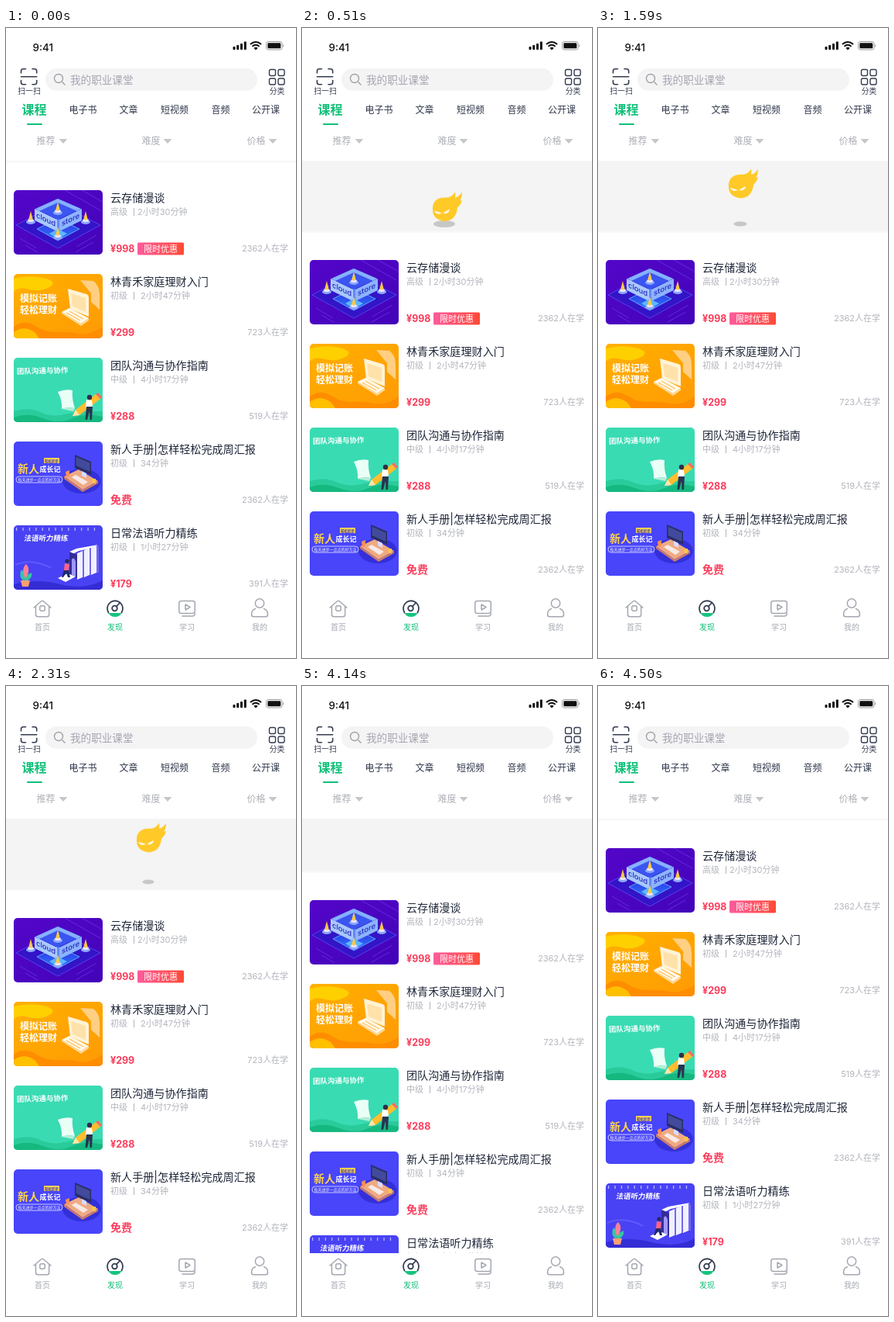
An HTML page for the animation above (4530 ms loop, 375 px wide and 812 px high).

```html
<!DOCTYPE html>
<html lang="zh-CN">
<head>
<meta charset="utf-8">
<title>课程</title>
<style>
html, body { margin: 0; width: 100%; height: 100%; overflow: hidden; background: #fff; }
svg { display: block; width: 375px; height: 812px; }
text { font-family: Inter, "Noto Sans CJK SC", "Noto Sans CJK", sans-serif; }
.mid { text-anchor: middle; }
.end { text-anchor: end; }
.line { fill: none; stroke-linecap: round; stroke-linejoin: round; }
.dark { stroke: #343c50; stroke-width: 1.6; }
.gray { stroke: #a4a7b1; stroke-width: 1.5; }
.title { font-size: 14.1px; fill: #1f2739; }
.meta { font-size: 11px; fill: #b3b5bd; }
.price { font-size: 12.5px; font-weight: 700; fill: #fb3d5c; }
.list, .ball, .shadow, .mascot { animation: 4.53s infinite; }
.list { animation-name: pull; }
.ball { animation-name: bounce; animation-timing-function: cubic-bezier(.333, 0, .667, 1); }
.shadow { animation-name: squeeze; animation-timing-function: cubic-bezier(.333, 0, .667, 1); transform-origin: 184px 252.5px; }
.mascot { animation-name: show; animation-timing-function: step-end; }
@keyframes pull {
  0% { transform: none; animation-timing-function: cubic-bezier(.4, 0, .5, 1); }
  11%  { transform: translateY(90px); animation-timing-function: linear; }
  84.77% { transform: translateY(90px); animation-timing-function: cubic-bezier(.65, 0, .6, 1); }
  99.3%, 100% { transform: none; }
}
@keyframes bounce {
  0%, .44%, 20.75%, 32.23%, 52.54%, 64.02%, 88.74%, 100% { transform: translateY(-37.5px); }
  10.6%, 42.38%, 74.17%, 78.59% { transform: none; }
}
@keyframes squeeze {
  0%, .44%, 20.75%, 32.23%, 52.54%, 64.02%, 88.74%, 100% { transform: scale(.5, .6); }
  10.6%, 42.38%, 74.17%, 78.59% { transform: none; }
}
@keyframes show {
  0% { opacity: 1; }
  84.5%, 100% { opacity: 0; }
}
</style>
</head>
<body>
<svg viewBox="0 0 375 812">
  <defs>
    <clipPath id="card"><rect width="115" height="83" rx="5"/></clipPath>
    <linearGradient id="hot"><stop stop-color="#ff5c9c"/><stop offset="1" stop-color="#ff4936"/></linearGradient>
    <linearGradient id="violet" x2="1" y2="1"><stop stop-color="#5406c9"/><stop offset="1" stop-color="#4204b8"/></linearGradient>
    <linearGradient id="floor" x2="0" y2="1"><stop stop-color="#2c2be0"/><stop offset="1" stop-color="#2f7bff"/></linearGradient>
    <linearGradient id="sun" x2="1" y2="1"><stop stop-color="#ffb000"/><stop offset="1" stop-color="#ff9a04"/></linearGradient>
    <g id="lamp">
      <ellipse cy="5" rx="6" ry="3" fill="#8fa6ff"/><ellipse cy="3" rx="4" ry="2" fill="#e9e6ff"/>
      <path d="M0-9L2.6 1Q0 4-2.6 1Z" fill="#ffc945"/>
    </g>

    <g id="art0">
      <rect width="115" height="83" fill="url(#violet)"/>
      <path d="M8 62L30 75M15 71L31 80M107 58L81 73M103 67L80 80M66 0L112 26M88 0L115 15" stroke="#6427e2"/>
      <path d="M3 45L57 17L112 45L57 75Z" fill="#3314c6" stroke="#5f4bff" stroke-width=".8"/>
      <path d="M30 50L57 37L85 50L57 65Z" fill="url(#floor)" stroke="#59a4ff"/>
      <path d="M28 24L57 11L87 24L57 38Z" fill="#3a55f0"/>
      <path d="M28 24L57 11V16L33 27ZM87 24L57 11V16L82 27Z" fill="#86b1ff"/>
      <path d="M27 24L56 38V53L27 39Z" fill="#a9c9ff"/><path d="M88 24L59 38V53L88 39Z" fill="#8db4ff"/>
      <path d="M56 38H59V53H56Z" fill="#6487f5"/>
      <path d="M46 56L57 50L69 56L57 63Z" fill="#5fb6ff"/>
      <g font-size="9.5" font-weight="500" fill="#2429b8" class="mid">
        <text transform="matrix(1 .48 0 1 41.5 41)">cloud</text>
        <text transform="matrix(1 -.48 0 1 73.5 41)">store</text>
      </g>
      <use href="#lamp" x="22" y="36"/><use href="#lamp" x="93" y="36"/>
      <use href="#lamp" x="57" y="24"/><use href="#lamp" x="57" y="56"/>
    </g>

    <g id="art1">
      <rect width="115" height="83" fill="url(#sun)"/>
      <path d="M0 6Q20 1 38 5T48 16Q34 24 20 20T0 23Z" fill="#ffd000"/>
      <path d="M0 68Q14 58 28 67T56 75T84 77T115 68V83H0Z" fill="#ff8d00"/>
      <path d="M0 75Q14 65 28 76L33 83H0Z" fill="#ffc000"/>
      <path d="M86 8L103 9Q111 15 111 27V46L100 36V25Z" fill="#ffcf83"/>
      <path d="M70 19L94 26Q97 27 97 31V55L73 45Z" fill="#fff3d7"/>
      <path d="M74 25L93 31V49L76 42Z" fill="#ffe2aa"/>
      <path d="M62 49L72 44L97 57L87 64Z" fill="#fff9ea"/>
      <path d="M62 49V51L87 67L97 60V57L87 64Z" fill="#ffd894"/>
      <path d="M68 50L86 60M72 48L90 58" stroke="#ffbd59" stroke-width="1.2"/>
      <g font-size="12" font-weight="900" fill="#fff"><text x="8" y="36">模拟记账</text><text x="8" y="50.5">轻松理财</text></g>
    </g>

    <g id="art2">
      <rect width="115" height="83" fill="#39dbb3"/>
      <path d="M0 69Q18 63 34 70T66 73T115 69V83H0Z" fill="#2acb9b"/>
      <path d="M0 77Q18 70 38 78T76 78T115 76V83H0Z" fill="#15b87f"/>
      <path d="M57 44Q67 40 76 42Q75 54 79 65Q70 63 62 66Q63 55 57 44Z" fill="#eafff6"/>
      <path d="M62 66Q69 63 79 65L77 69Z" fill="#b5eed9"/>
      <path d="M76 75L80 67L106 47L112 53L85 74Z" fill="#ffbd2f"/>
      <path d="M76 75L80 67L85 74Z" fill="#ffe5b1"/><path d="M106 47L109 45L114 51L112 53Z" fill="#ff6965"/>
      <circle cx="98" cy="51" r="3.2" fill="#302d4b"/><path d="M94 54L101 55L102 64H93Z" fill="#fff"/>
      <path d="M94 63H102L101 80H98.5L98 69L95 80H92.5Z" fill="#263451"/>
      <text x="4" y="21" font-size="9.5" font-weight="700" fill="#fff" transform="rotate(-1.5 4 20)">团队沟通与协作</text>
    </g>

    <g id="art3">
      <rect width="115" height="83" fill="#4845fa"/>
      <ellipse cx="88" cy="51" rx="25" ry="16" fill="#3430d9"/>
      <path d="M65 45L84 36L109 51L89 62Z" fill="#efaa82"/><path d="M65 45V48L89 65L109 54V51L89 62Z" fill="#c87a70"/>
      <path d="M79 17L100 26V43L79 34Z" fill="#292d63"/><path d="M80.5 19.5L98.500 27.5V39L80.500 31Z" fill="#424a9b"/>
      <path d="M88 38V44L94 47V41Z" fill="#d8dcff"/><path d="M75 46L80 43L96 52L90 56Z" fill="#f7e9e7"/>
      <path d="M67 39L72 37V45L68 46Z" fill="#ff8e57"/><path d="M101 48H106V54H102Z" fill="#ffc448"/>
      <rect x="39" y="21" width="20" height="7" rx="1" fill="#ffd64f"/>
      <text x="49" y="26.5" class="mid" font-size="4.5" font-weight="700" fill="#433cad">轻松起步</text>
      <text x="5" y="39.5" font-size="14" font-weight="900" fill="#ffd548">新人</text>
      <text x="33.5" y="39" font-size="9" font-weight="800" fill="#fff">成长记</text>
      <rect x="3" y="45" width="60" height="8" rx="4" fill="none" stroke="#fff" stroke-width=".7"/>
      <text x="33" y="51" class="mid" font-size="5" fill="#fff">每天进步一点点的好方法</text>
    </g>

    <g id="art4">
      <rect width="115" height="83" fill="#4842f4"/>
      <path d="M3 5H112" stroke="#b9b5ff" stroke-width="4" stroke-dasharray="1.3 7.1"/>
      <path d="M2 51Q24 42 48 55" fill="none" stroke="#5f59ff" stroke-width="2"/>
      <path d="M0 76Q30 68 60 76T115 71V83H0Z" fill="#342cd4"/>
      <path d="M72 34L81 30L109 25L101 29L93 31L84 33L76 37Z" fill="#fff"/>
      <path d="M72 34L82 38V68L72 63Z" fill="#332c9b"/><path d="M75 44Q78 40 80 47V66L75 64Z" fill="#9f98ff"/>
      <g id="books">
        <path d="M82 36L89 33V67L82 70ZM91 32L98 29V64L91 67ZM100 29L107 26V61L100 64Z" fill="#f1f0ff"/>
        <path d="M89 33L91 32V67L89 67ZM98 29L100 29V64H98ZM107 26L110 27V61L107 61Z" fill="#7168ee"/>
      </g>
      <path d="M57 68L70 62L80 66L67 73Z" fill="#fff"/>
      <circle cx="69" cy="46" r="2.6" fill="#27295a"/><path d="M66 49L72 50L71 58H65Z" fill="#ff6582"/>
      <path d="M65 58H71L73 67H70L68 61L64 67H62Z" fill="#202a62"/>
      <path d="M14 73Q5 66 10 57Q17 63 14 73Q25 69 23 61Q14 64 14 73" fill="#33c7a2"/>
      <path d="M15 69Q9 56 16 50Q23 57 15 69Z" fill="#ff8095"/><path d="M9 71H21L19 79H11Z" fill="#ff9f71"/>
      <text transform="translate(13 20) skewX(-8)" font-size="9.5" font-weight="900" fill="#fff">法语听力精练</text>
    </g>
  </defs>

  <rect width="375" height="812" fill="#fff"/>
  <rect y="171" width="375" height="560" fill="#f4f4f4"/>

  <g class="mascot">
    <ellipse class="shadow" cx="184" cy="252.5" rx="14" ry="4.5" fill="#c7c7c7"/>
    <g class="ball">
      <path d="M169 235C168 223 176 218 186 219C192 219 195 216 198 212C199 215 198 217 198 219C202 218 205 215 207 212C207 217 206 220 204 223L207 222C206 227 203 230 201 232C200 243 194 249 185 249.5C176 249 169 244 169 235Z" fill="#ffc928"/>
      <path d="M171 236L181 239Q174 242 171 236ZM182 239L191 234Q190 241 182 239Z" fill="#fff"/>
    </g>
  </g>

  <g class="list">
    <rect y="172" width="375" height="700" fill="#fff"/>
    <rect y="172" width="375" height="2" fill="#f9f9f9"/>
    <g id="items"></g>
  </g>

  <rect width="375" height="171" fill="#fff"/>
  <text x="34.5" y="29.5" font-size="13.4" font-weight="500" fill="#111">9:41</text>
  <g fill="#111">
    <rect x="293.5" y="24" width="3" height="4" rx=".7"/><rect x="298.2" y="22" width="3" height="6" rx=".7"/>
    <rect x="303" y="20" width="3" height="8" rx=".7"/><rect x="307.8" y="17.5" width="3" height="10.5" rx=".7"/>
    <path d="M323 28.5L320.3 25.7Q323 23.6 325.7 25.7Z"/>
    <g class="line" stroke="#111" stroke-width="2" style="stroke-linecap:butt">
      <path d="M318.4 23.7Q323 19.8 327.6 23.7M315.9 20.9Q323 15 330.1 20.9"/>
    </g>
    <rect x="336.5" y="17.5" width="20.5" height="10.5" rx="2.8" fill="none" stroke="#999"/>
    <rect x="338.3" y="19.3" width="17" height="7" rx="1.4"/><path d="M358.3 20.8Q360.5 22.8 358.3 24.8Z" fill="#999"/>
  </g>

  <path class="line dark" d="M19.5 58V55.5Q19.5 52.8 22.2 52.8H25.5M34 52.8H37Q39.7 52.8 39.7 55.5V58M39.7 67.5V70Q39.7 72.7 37 72.7H34M25.5 72.7H22.2Q19.5 72.7 19.5 70V67.5M19.5 62.7H39.7"/>
  <text class="mid" x="30" y="85.3" font-size="9.8" fill="#343c50">扫一扫</text>
  <rect x="51" y="52" width="274" height="29" rx="14.5" fill="#f4f4f4"/>
  <path class="line" d="M73 70L76 73" stroke="#a1a2aa" stroke-width="1.5"/>
  <circle class="line" cx="68" cy="65" r="5.5" stroke="#a1a2aa" stroke-width="1.4"/>
  <text x="83" y="72" font-size="13.6" fill="#a5a5b4">我的职业课堂</text>
  <g class="line dark" style="stroke-width:1.4">
    <rect x="340.5" y="53.5" width="8" height="8" rx="2"/><rect x="352" y="53.5" width="8" height="8" rx="2"/>
    <rect x="340.5" y="65" width="8" height="8" rx="2"/><rect x="352" y="65" width="8" height="8" rx="2"/>
  </g>
  <text class="mid" x="350.5" y="85.3" font-size="9.8" fill="#343c50">分类</text>

  <text x="20.5" y="111.3" font-size="16" font-weight="700" fill="#0fbf78">课程</text>
  <rect x="27" y="123" width="20" height="2" rx="1" fill="#0fbf78"/>
  <g font-size="12" fill="#30384c">
    <text x="81.5" y="110">电子书</text><text x="146.5" y="110">文章</text><text x="200" y="110">短视频</text>
    <text x="265.5" y="110">音频</text><text x="318" y="110">公开课</text>
  </g>
  <g font-size="12" fill="#aeb0b7">
    <text x="39.5" y="150">推荐</text><text x="175.5" y="150">难度</text><text x="311.5" y="150">价格</text>
    <path d="M68.5 143H79.5L74 149ZM203.5 143H214.5L209 149ZM339.5 143H350.5L345 149Z" fill="#c6c7ca"/>
  </g>

  <rect y="731" width="375" height="81" fill="#fff"/>
  <g class="line gray">
    <path d="M36 747L46 738.5Q47 737.8 48 738.5L58 747M38.5 745.5V756Q38.5 758.8 41.3 758.8H53Q55.7 758.8 55.7 756V745.5"/>
    <rect x="43.8" y="744.8" width="6.5" height="6.5" rx="2"/>
    <rect x="223.8" y="738.5" width="20.5" height="16" rx="3"/><path d="M232 743V750L238 746.5ZM228 758H241Q244 758 244.5 755"/>
    <circle cx="328" cy="741.5" r="5.7"/>
    <path d="M322.5 748.5Q317.5 750 317.5 756Q317.5 758.8 320.300 758.800H335.700Q338.500 758.800 338.500 756Q338.500 750 333.500 748.500"/>
  </g>
  <path d="M132.5 754H149.5Q147 759 141 759Q135 759 132.5 754Z" fill="#16c47e"/>
  <g class="line dark" style="stroke-width:1.8">
    <path d="M132.5 753.5A10 10 0 1 1 149.5 753.5M147.5 740.5L142.8 745.5"/><circle cx="140.5" cy="748" r="3.3"/>
  </g>
  <g class="mid" font-size="10" fill="#a4a7b1">
    <text x="47" y="776">首页</text><text x="141" y="776" fill="#0fbf78">发现</text>
    <text x="234" y="776">学习</text><text x="328" y="776">我的</text>
  </g>
</svg>
<script>
const courses = [
  ['云存储漫谈', '高级', '2小时30分钟', '¥998', 2362],
  ['林青禾家庭理财入门', '初级', '2小时47分钟', '¥299', 723],
  ['团队沟通与协作指南', '中级', '4小时17分钟', '¥288', 519],
  ['新人手册|怎样轻松完成周汇报', '初级', '34分钟', '免费', 2362],
  ['日常法语听力精练', '初级', '1小时27分钟', '¥179', 391]
];
const badge = `<rect x="170" y="67.5" width="60" height="16" rx="1.5" fill="url(#hot)"/>
  <text class="mid" x="200" y="79.6" font-size="11" fill="#fff">限时优惠</text>`;
const row = ([title, level, time, price, count], i) => `
  <g transform="translate(0 ${209 + i * 108})">
    <g transform="translate(10 0)" clip-path="url(#card)"><use href="#art${i}"/></g>
    <text class="title" x="135" y="14.5">${title}</text>
    <text class="meta" x="135" y="32">${level}</text>
    <rect x="165" y="23" width="1" height="10" fill="#b3b5bd"/>
    <text class="meta" x="${i ? 174 : 170}" y="32">${time}</text>
    <text class="price" x="135" y="79.5"${price === '免费' ? ' style="font-size:14px"' : ''}>${price}</text>
    ${i ? '' : badge}
    <text class="meta end" x="365" y="79">${count}人在学</text>
  </g>`;
document.getElementById('items').innerHTML = courses.map(row).join('');
</script>
</body>
</html>
```
